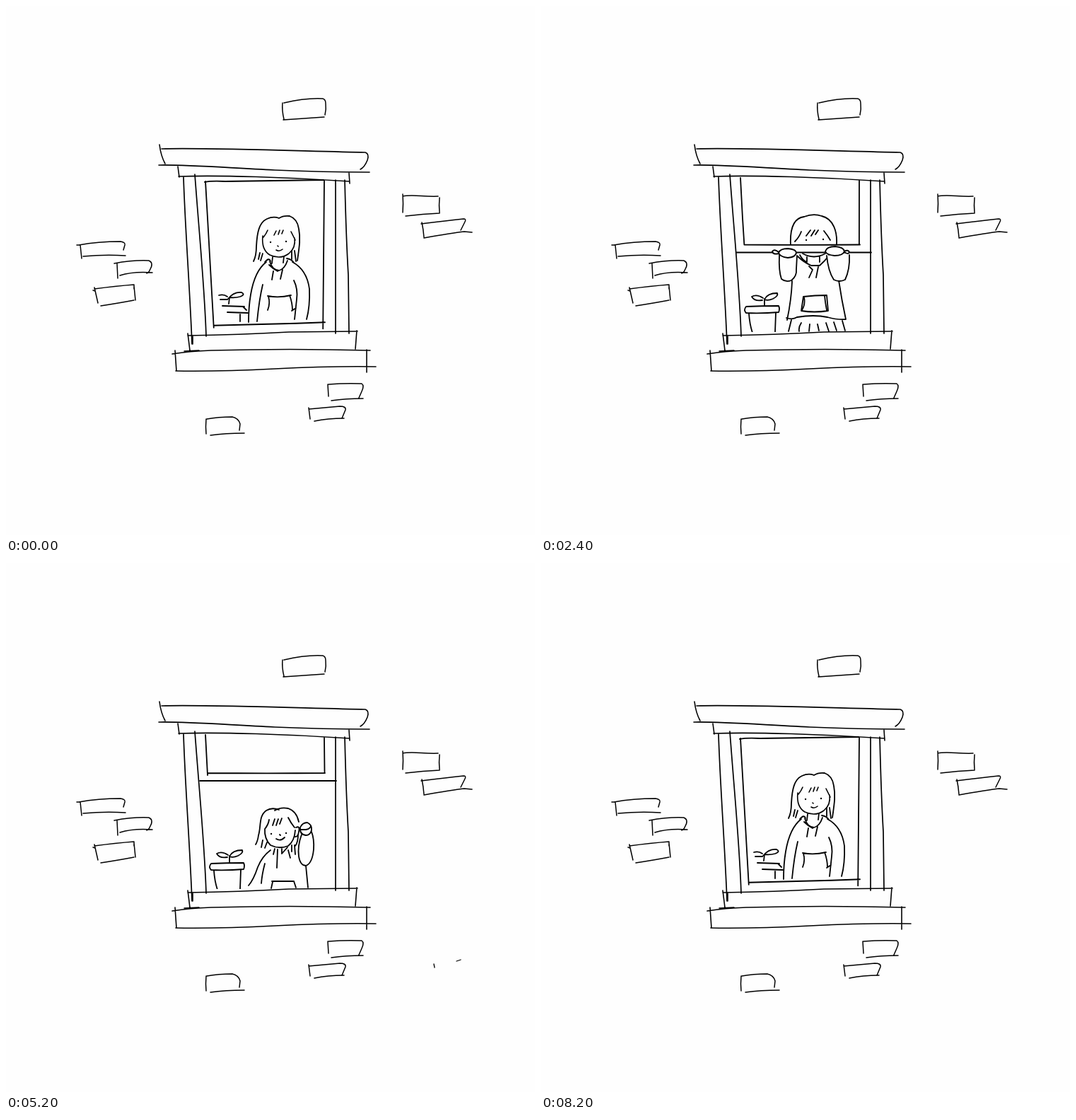
An HTML page with a canvas for the animation above (8.4 s loop, 748 by 748 pixels).

```html
<!DOCTYPE html>
<html lang="en">
<head>
<meta charset="utf-8">
<title>Window</title>
<style>
html, body { margin: 0; height: 100%; overflow: hidden; background: #fefefe; }
canvas { display: block; }
</style>
</head>
<body>
<canvas id="stage" width="748" height="748"></canvas>
<script>
const ctx = document.getElementById('stage').getContext('2d');
const PAPER = '#fefefe', INK = '#000';
const STEP = 200, SLOTS = 42, SILL = 461;

const bricks = [
  'M391 137Q390 148 393 160M393 137C410 133 430 130 448 131Q452 132 452 138Q453 146 451 154M392 161Q420 159 450 157',
  'M561 266Q562 280 561 292M561 269C575 266 590 270 611 269M613 271Q612 281 613 293M565 297Q590 294 613 293',
  'M588 306Q590 315 591 327M587 308Q620 304 647 301Q651 301 649 305L643 317M591 328Q630 321 648 319L659 320',
  'M100 338L105 338L107 357M103 338Q130 333 162 333Q169 334 168 338L166 345M109 354Q140 351 169 353',
  'M153 364Q180 359 202 360Q209 363 204 372Q202 377 199 378M157 364L158 385M161 381Q180 375 207 377',
  'M123 402L126 403M125 398L130 420M125 400Q155 396 181 394L181 400M181 396L183 416M134 424Q160 420 181 416',
  'M283 584Q282 595 283 605M284 584Q300 581 320 581Q329 583 331 591L330 600M289 607Q310 604 337 604',
  'M455 535L456 552M456 535Q480 533 503 534Q507 537 503 545L499 554M460 558Q480 555 505 555',
  'M428 568L430 584M428 570Q450 568 472 566Q481 566 480 571L475 583M436 587Q455 583 478 583'
].join('');

const lintel = 'M217 196Q219 212 225 223M220 202C290 200 440 206 508 207Q514 209 511 218Q507 228 501 231' +
  'M216 225C250 224 300 228 380 232Q450 235 514 235M243 227L245 242M244 241C300 239 400 242 486 248M485 236L486 251';
const posts = 'M251 242C253 310 260 400 263 478M267 238C273 320 281 400 283 467' +
  'M466 246L466 463M479 246Q481 330 484 380L485 463';
const sill = 'M257 466Q330 465 400 461L497 460M257 463L260 487M264 466L264 478M496 459L494 485' +
  'M252 488L273 487M235 492Q260 488 290 487Q400 484 515 487M239 487L241 516M240 516Q300 517 380 513T523 510M510 486L510 518';

const loosePot = 'M301 409Q308 407 313 411M303 415L313 415M314 414Q322 404 333 405Q339 408 331 411Q324 413 316 412' +
  'M316 412L315 421M306 424L337 425';
const closedRim = 'M313 433L342 434M331 436L331 446M335 425L340 430';
const pot = 'M314 413Q305 407 298 411Q302 418 313 416M316 415Q320 406 334 406Q336 410 328 414Q321 417 316 415M316 414L316 424' +
  'M290 425Q312 424 336 424Q338 428 336 433Q312 435 290 434Q286 430 290 425Z';
const potBody = 'M294 435Q295 450 299 462M332 434L331 461';

const hairTop = 'M386 300Q378 297 369 301C358 306 355 320 354 340Q354 353 350 361M386 300Q392 296 401 297Q412 301 414 315C417 330 414 345 412 360' +
  'M404 346L404 358M408 346L410 361M363 350L360 360M359 349L357 358';
const face = 'M363 325Q361 345 373 352Q388 359 400 350Q410 342 408 328M370 317Q368 322 364 327M382 318L379 324M387 317L385 323M392 317L390 322' +
  'M403 319Q406 325 409 331M384 339L385 340';
const smile = 'M382 345Q386 348 391 344', flatMouth = 'M380 346L391 344';
const torso = 'M377 355L376 364M393 354L392 363M373 361Q376 373 386 374Q394 372 398 360M366 362Q372 355 374 361' +
  'M372 366Q378 372 384 375M397 357Q404 358 407 363M378 375L376 387M391 373L388 386' +
  'M368 362C355 372 349 390 346 408Q343 425 343 447M363 394Q358 415 355 446' +
  'M405 362C420 370 427 385 429 400Q430 425 425 443M407 388Q413 400 411 415L408 443' +
  'M370 410Q386 413 403 409M371 411Q374 420 370 430M401 409Q405 420 405 430M410 427L404 431';

const peekHead = 'M353 339C352 320 355 300 372 298Q385 293 397 297C414 301 419 320 418 337' +
  'M368 319Q365 327 359 333M381 317L375 325M387 317L382 325M392 317L388 323M400 318Q405 324 409 331';
const hood = 'M370 350Q386 359 402 350M376 355L376 362M394 355L394 362M363 354Q371 362 382 367L394 367Q402 360 407 353' +
  'M366 352Q370 360 376 362M379 368L384 373L379 384M392 369L389 384';
const lower = 'M351 366L355 390Q354 415 348 444M419 366L421 388Q425 415 431 443M347 441Q356 444 362 440Q386 436 405 440Q420 444 431 443' +
  'M371 411Q387 409 404 409L406 431Q386 434 368 431L371 411M372 412Q374 422 369 430M401 410Q402 420 404 430' +
  'M354 444L350 460M368 448Q364 454 365 460M380 450L379 460M391 450L393 459M403 448L407 460M414 447L418 459M426 445L430 459';
const arms = 'M337 352Q336 375 340 386Q346 391 354 388Q362 382 361 372L362 353M404 353Q406 375 414 387Q422 391 430 387Q437 372 436 352';
const hands = 'M336 349Q338 343 349 343Q361 344 361 349Q360 355 349 356Q338 355 336 349Z' +
  'M402 347Q404 340 416 340Q428 341 429 347Q427 353 415 353Q404 352 402 347Z' +
  'M336 350Q328 352 327 347Q330 343 336 348M429 348Q435 352 436 348Q434 344 429 347';
const lowHands = 'M327 350Q326 344 330 345Q334 348 340 347Q350 346 356 348Q354 355 345 356Q334 356 327 350Z' +
  'M400 349Q402 344 410 345Q416 350 429 350Q420 356 408 356Q399 355 400 349Z';

const leanHead = 'M386 349Q376 345 368 350C357 358 361 372 357 385Q356 393 353 398M380 350Q388 345 399 347Q411 351 414 366M413 384Q413 395 409 400' +
  'M366 376Q365 390 374 399Q386 405 399 400Q408 393 409 378M372 363Q371 370 366 376M380 362L377 371M385 362L382 371M390 361L387 369' +
  'M399 360Q403 368 408 374M410 374Q416 371 414 380Q413 388 408 387M387 384L388 385M382 390Q388 394 394 388' +
  'M363 392L361 402M369 395L366 403M404 399L404 408M408 399L409 412';
const leanBody = 'M374 406Q362 415 356 430Q350 448 343 456M366 425Q362 440 361 453M380 404L378 412M384 405L383 431' +
  'M390 404L390 411L398 402M399 406L402 417M376 450L407 450M377 451L375 460M407 450L410 459M424 428L427 459';
const raisedArm = 'M418 384Q412 400 414 415Q416 428 424 428Q433 425 435 405Q436 390 432 380' +
  'M416 374Q419 367 426 367Q433 370 432 378Q430 385 424 385Q415 384 416 374ZM416 377L424 377Q430 376 431 372';
const loweredArm = 'M405 407Q420 411 424 428';
const foldedArms = 'M354 432Q338 442 334 455Q340 462 362 461L398 459M405 408Q422 412 427 428Q438 443 438 455Q428 462 402 461M398 450Q388 450 384 457';

function draw(path, { w = 1.8, y = 0, fill } = {}) {
  const p = new Path2D(path);
  ctx.save();
  ctx.translate(0, y);
  if (fill) ctx.fill(p);
  ctx.lineWidth = w;
  ctx.stroke(p);
  ctx.restore();
}

function eyes(x1, y1, x2, y2, dy = 0) {
  draw(`M${x1} ${y1}h.1M${x2} ${y2}h.1`, { w: 2.3, y: dy });
}

function clipped(path, paint) {
  ctx.save();
  ctx.clip(new Path2D(path));
  paint();
  ctx.restore();
}

function uprightHead(k, dy) {
  draw(hairTop, { y: dy });
  draw(face, { y: dy, w: 1.6 });
  draw(k < 3 ? smile : flatMouth, { y: dy, w: 1.6 });
  eyes(374, 334, 396, 333, dy);
}

const paneAt = [449.5, 449.5, 449.5, 449.5, 449.5, 446, 440, 431.5, 420, 404, 385, 362, 337.5, 310];
const nodAt = [0, 0, 1, 3, 5, 4, 2];

function sash(pane, rail, tilt, closed) {
  const left = 282 + (pane - 243) * .057;
  const over = closed ? 3 : 0;
  draw(`M282 ${closed ? 248 : 243}L285 300L${left} ${pane - tilt + over}` +
    `M450 247L${450.5 - (pane - 297) * .015} ${pane + tilt + over * 3}` +
    `M${left} ${pane - tilt}Q370 ${pane + .7} 451 ${pane + tilt}`);
  if (closed) draw('M281 249Q290 247 310 248L449 246');
  else draw(`M${270 + (rail - 240) * .06} ${rail - tilt}L467 ${rail + tilt}`);
}

function upright(k, pane, rail, tilt, closed) {
  const nod = nodAt[k] || 0, lift = rail - 348.5;
  clipped(`M270 240H470V${pane + tilt}L270 ${pane - tilt}Z`, () => {
    draw(k < 8 ? loosePot : pot);
    if (closed) draw(closedRim);
    if (k === 12) {
      draw(peekHead);
      eyes(375, 331, 399, 330);
    } else {
      uprightHead(k, nod);
      if (k < 12) draw(torso, { y: nod });
    }
  });
  if (closed) return;
  clipped(`M270 ${rail - tilt}L470 ${rail + tilt}V${SILL}H270Z`, () => {
    draw(pot);
    draw(potBody);
    if (k === 13) uprightHead(k, 0);
    draw(hood);
    draw(lower);
    if (lift < 55) draw(arms, { y: lift, fill: true });
  });
}

function leaning(k) {
  const rise = k === 14 ? -24 : k === 15 ? -9 : 0;
  const bob = k < 18 ? rise : [0, 1, 2, 1][k - 18];
  clipped(`M270 310H470V${SILL}H270Z`, () => {
    draw(pot);
    draw(potBody);
    draw(leanBody, { y: rise });
    draw(leanHead, { y: bob });
    eyes(375, 383, 396, 382, bob);
    if (k < 16) draw(loweredArm, { y: rise });
    else if (k < 18) draw(raisedArm, { y: (k - 16) * 8, fill: true });
    else draw(foldedArms);
  });
  if (k === 16) draw('M605 567L606 572M637 563L643 561', { w: 1.3 });
}

function render(k) {
  const closed = k < 5;
  const pane = paneAt[k] ?? 297;
  const rail = pane + (k < 12 ? 12 : 11);
  const tilt = Math.min(0, (338 - pane) * .02);
  ctx.fillStyle = PAPER;
  ctx.strokeStyle = INK;
  ctx.lineCap = ctx.lineJoin = 'round';
  ctx.fillRect(0, 0, 748, 748);
  draw(bricks, { w: 1.5 });
  if (k < 14) upright(k, pane, rail, tilt, closed);
  else leaning(k);
  sash(pane, rail, tilt, closed);
  if (k > 5 && k < 14) {
    clipped(`M0 0H748V${SILL}H0Z`, () =>
      draw(k < 9 ? lowHands : hands, { y: rail - 348.5, fill: true, w: 1.9 }));
  }
  draw(lintel, { w: 1.6 });
  draw(posts, { w: 1.7 });
  draw(sill, { w: 1.6 });
}

// The sequence plays forward, then back to the closed window.
function tick() {
  const slot = Math.floor(performance.now() / STEP) % SLOTS;
  render(Math.min(slot, SLOTS - slot));
  requestAnimationFrame(tick);
}
tick();
</script>
</body>
</html>
```
